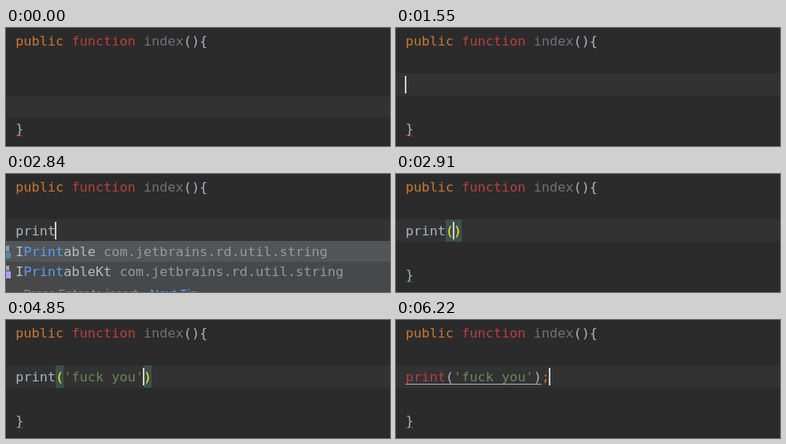
An HTML page for the animation above (6620 ms loop, 480x148 px).

```html
<!DOCTYPE html>
<html lang="en">
<head>
<meta charset="utf-8">
<title>Typing in a code editor</title>
<style>
  html, body { margin: 0; width: 100%; height: 100%; overflow: hidden; background: #2b2b2b; }
  svg { display: block; }
  text { font: 16.61px "DejaVu Sans Mono", monospace; white-space: pre; }
  .hint { font: 15px Inter, sans-serif; }
</style>
</head>
<body>
<svg id="stage" width="480" height="148" viewBox="0 0 480 148"></svg>
<script>
const LOOP = 6620, STEP = 69, LEFT = 12, CELL = 10;
const PLAIN = '#a9b7c6', ORANGE = '#cc7832', RED = '#bc3f3c', GRAY = '#72737a',
      GREEN = '#6a8759', BLUE = '#589df6', YELLOW = '#ffef28';
const stage = document.getElementById('stage');

// Start time, typed line, caret column, whether the brackets are matched
const edits = [
  [1550, '', 0],
  [1750, 'p', 1],
  [1970, 'pr', 2],
  [2110, 'pri', 3],
  [2310, 'prin', 4],
  [2440, 'print', 5],
  [2910, 'print()', 6, true],
  [3440, "print('')", 7],
  [3790, "print('f')", 8],
  [4050, "print('fu')", 9],
  [4320, "print('fuck you')", 15],
  [4850, "print('fuck you')", 16, true],
  [4980, "print('fuck you')", 17, true],
  [5380, "print('fuck you');", 18, true],
  [5450, "print('fuck you');", 18]
];

// Pointer trips: first and last visible time, travel time, end points
const trips = [
  { from: 70, until: 1550, travel: 620, a: [242, 128], b: [116, 72] },
  { from: 5730, until: 6220, travel: 420, a: [116, 72], b: [350, 136] }
];

const rect = (x, y, w, h, fill) =>
  `<rect x="${x}" y="${y}" width="${w}" height="${h}" fill="${fill}"/>`;

const stroke = (d, color, width = 1) =>
  `<path d="${d}" fill="none" stroke="${color}" stroke-width="${width}"/>`;

// parts: [string, color] pairs laid out one after another
const text = (y, ...parts) => `<text x="${LEFT}" y="${y}">` +
  parts.map(([s, color]) => `<tspan fill="${color}">${s}</tspan>`).join('') + '</text>';

function typedLine(line, caret, matched, failed) {
  const [, word, open, string, close, end] = line.match(/^(\w*)(\(?)('.*')?(\)?)(;?)$/);
  const bracket = matched ? YELLOW : PLAIN;
  let out = '';
  if (matched) {
    for (const column of [line.indexOf('('), line.indexOf(')')])
      out += rect(LEFT + column * CELL, 57, CELL, 28, '#3b514d');
  }
  out += text(77, [word, failed ? RED : PLAIN], [open, bracket],
    [string || '', GREEN], [close, bracket], [end, ORANGE]);
  if (failed) out += rect(LEFT, 80, 170, 1, PLAIN);
  return out + rect(LEFT - 1 + caret * CELL, 60, 2, 22, '#ced0d2');
}

function popup() {
  const origin = [' com.jetbrains.rd.util.string', '#999999'];
  const item = (y, tail) => text(y, ['I', '#bbbbbb'], ['Print', BLUE], [tail, '#bbbbbb'], origin);
  return rect(0, 84, 480, 64, '#46484a') + rect(0, 84, 480, 26, '#525658') +
    rect(0, 90, 4, 7, '#8a9aa5') + rect(0, 98, 6, 8, '#4d8ba3') +
    rect(0, 115, 4, 6, '#9aa7b0') + rect(0, 122, 6, 9, '#b39af0') +
    item(103, 'able') + item(128, 'ableKt') +
    '<text class="hint" x="22" y="156" fill="#8c8c8c">Press Enter to insert</text>' +
    `<text class="hint" x="180" y="156" fill="${BLUE}">Next Tip</text>`;
}

function pointer(t) {
  const trip = trips.find(p => t >= p.from && t < p.until);
  if (!trip) return '';
  const elapsed = Math.floor((t - trip.from) / STEP) * STEP;
  const p = Math.min(1, elapsed / trip.travel);
  const eased = p * p * (3 - 2 * p);
  const [x, y] = trip.a.map((v, i) => Math.round(v + (trip.b[i] - v) * eased));
  const click = t >= 690 && t < 760
    ? '<circle cx="116" cy="72" r="15" fill="#ff0" fill-opacity=".47"/>' : '';
  return click + stroke(`M${x - 3} ${y - 6.5}h3m1 0h3M${x + .5} ${y - 6}v13M${x - 3} ${y + 7.5}h3m1 0h3`, '#d4d4d4');
}

function scene(t) {
  const edit = edits.findLast(([start]) => t >= start);
  let out = rect(0, 0, 480, 148, '#2b2b2b') +
    rect(0, edit ? 57 : 85, 480, edit ? 28 : 27, '#323232') +
    rect(0, 146, 480, 2, '#282828') +
    text(22, ['public ', ORANGE], ['function ', RED], ['index', GRAY], ['(){', PLAIN]) +
    text(132, ['}', PLAIN]) +
    stroke('M12 136l2-2 2 2 2-2 2 2 1-1', t < 2840 ? RED : '#5a5d5f');
  if (edit) out += typedLine(edit[1], edit[2], edit[3], t >= 5730);
  if (t >= 2840 && t < 2910) out += popup();
  return out + pointer(t);
}

let shown = '';
function frame() {
  const next = scene(performance.now() % LOOP);
  if (next !== shown) stage.innerHTML = shown = next;
  requestAnimationFrame(frame);
}
frame();
</script>
</body>
</html>
```
